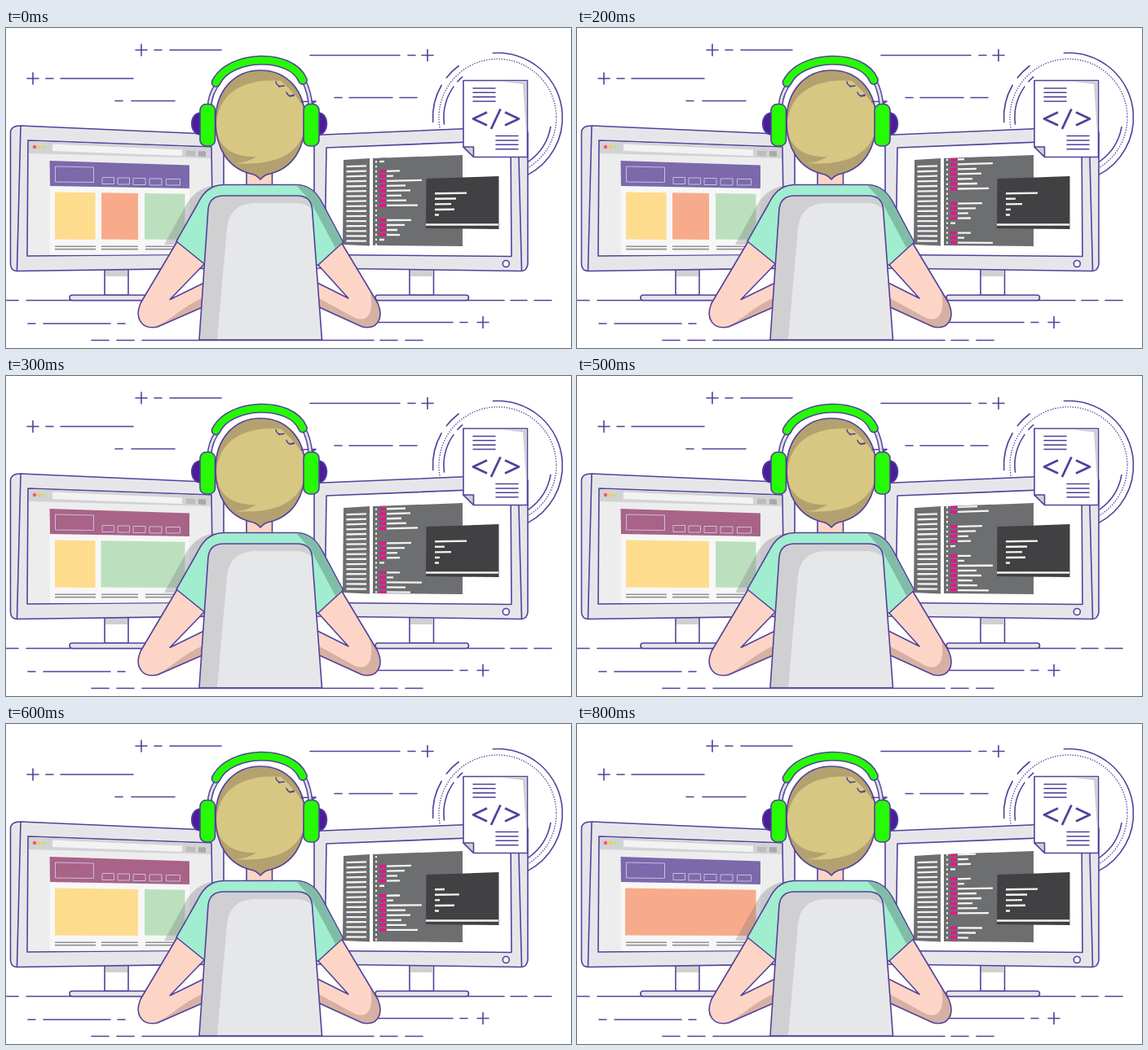
An HTML page for the animation above (0.9 s loop, 693 by 393 pixels).

```html
<!DOCTYPE html>
<html lang="en">
<head>
<meta charset="utf-8">
<title>Programmer at work</title>
<style>
  html, body { margin: 0; width: 100%; height: 100%; overflow: hidden; background: #fff; }
  svg { display: block; width: 693px; height: 393px; }
  .ink { stroke: #53419b; stroke-width: 1.6; stroke-linejoin: round; stroke-linecap: round; }
  .line { fill: none; }
  .case { fill: #e6e6ea; }
  .skin { fill: #fcd5c7; }
  .green { fill: #26fa05; }
</style>
</head>
<body>
<svg viewBox="0 0 693 393">
  <defs>
    <clipPath id="editor"><path d="M450 160L560 156V268L450 267Z"/></clipPath>
  </defs>

  <!-- Background dashes and ground -->
  <path class="ink line" d="M159 27h14M166 20v14M182 27h9M201 27h63
    M26 62h14M33 55v14M49 62h9M67 62h89M134 89.500h9M154 89.500h53
    M373 33.500h110M493 33.500h9M510 33.500h14M517 26.500v14
    M403 85.500h9M421 85.500h53M483 85.500h21
    M0 334.500h15M25 334.500h586M619 334.500h20M648 334.500h21
    M27 363h9M46 363h82M137 363h9M456 361.500h92M557 361.500h9M578 361.500h14M585 354.500v14
    M105 383.500h21M136 383.500h21M167 383.500h284M459 383.500h21M490 383.500h21"/>

  <!-- Badge rings: each dash is an arc in degrees -->
  <g class="ink line" transform="translate(603 110)">
    <circle r="79.500" pathLength="360" stroke-dasharray="157 203" transform="rotate(-94)"/>
    <circle r="79.500" pathLength="360" stroke-dasharray="34 8 15 303" transform="rotate(176)"/>
    <circle r="72" stroke-dasharray="0.100 3" style="stroke-width:1.500"/>
    <circle r="66" pathLength="360" stroke-dasharray="42 7 7 304" transform="rotate(173)"/>
    <circle r="66" pathLength="360" stroke-dasharray="45 315" transform="rotate(10)"/>
  </g>

  <!-- Left monitor -->
  <path class="ink" fill="#fff" d="M121 296H150V328H121Z"/>
  <path fill="#d0d0d2" d="M122 297H149V305H122Z"/>
  <rect class="ink case" x="78" y="328" width="122" height="6.500" rx="3.200"/>
  <path class="ink case" d="M18 120L267 131V295L13 298.500Q6 298 5.500 290V128Q6 120 18 120Z"/>
  <path class="ink line" d="M18 120.500L13.500 298"/>
  <path class="ink" fill="#ededed" d="M27 138L252 146L254 278L26 280Z"/>
  <path fill="#f7f7f7" d="M53.500 163L225 168.500V278L54 279Z"/>
  <path fill="#d2d3d5" d="M28 139L251 147V160L28 154Z"/>
  <path fill="#f3f3f4" d="M57 142.500L216 149.500V157L57 151Z"/>
  <path fill="#bcbcbe" d="M221 150.500l11 .500v6.500l-11-.500z"/>
  <path fill="#a9a9ab" d="M236 151l9 .500v6.500l-9-.500z"/>
  <circle cx="35" cy="146" r="2.200" fill="#f15a5a"/>
  <circle cx="40.700" cy="146.200" r="2.200" fill="#fbc75c"/>
  <circle cx="46.400" cy="146.400" r="2.200" fill="#c5dd85"/>
  <path id="banner" d="M53.500 163L225 168.500V197L54 194Z"/>
  <path fill="none" stroke="#c8bfdf" d="M60.500 170L107.500 171V189.500L60.500 189ZM118 183.500h14.500v8h-14.500zM137 184h14.500v8h-14.500zM156 184.500h15v8h-15zM176 185h15v8h-15zM196.500 185.500h17v7.500h-17z"/>
  <g id="cards"></g>
  <path stroke="#929295" stroke-width="1.600" d="M60 268.300h50M60 271.600h50M117 268.300h45M117 271.600h45M171 268.300h46M171 271.600h46"/>

  <!-- Right monitor -->
  <path class="ink" fill="#fff" d="M495 296H524.500V328H495Z"/>
  <path fill="#d0d0d2" d="M496 297H524V305H496Z"/>
  <rect class="ink case" x="453" y="328" width="114.500" height="6.500" rx="3.200"/>
  <path class="ink case" d="M378 131.500L628 121Q639 120 640 129V290Q639 298 632 298.500L378 295Z"/>
  <path class="ink line" d="M628 121L632.500 298"/>
  <path class="ink" fill="#fff" d="M393 147L619 138L620 280.500L391 278.500Z"/>
  <circle class="ink" fill="#fff" cx="613.300" cy="289.500" r="4"/>
  <path fill="#6d6e70" d="M414 162L446 160V267.500L413 266ZM450 160L560 156V268L450 267Z"/>
  <path id="sidebar" stroke="#f2f2f2" stroke-width="2.300"/>
  <g clip-path="url(#editor)">
    <path id="keywords" stroke="#e0188c" stroke-width="3.900"/>
    <path id="statements" stroke="#f4f4f4" stroke-width="2.300"/>
  </g>
  <path fill="#414042" d="M515.500 185L604.500 182V247L515 246Z"/>
  <path stroke="#f2f2f2" stroke-width="2.400" d="M515 241.500H604"/>
  <path id="terminal" stroke="#f2f2f2" stroke-width="2.400"/>

  <!-- Document badge -->
  <path class="ink" fill="#fff" d="M561 64.500H639.500V158.500H574L561 146Z"/>
  <path fill="#d0d0d2" d="M603 65.300L634 69L638.700 140V65.300Z"/>
  <path class="ink" fill="#d0d0d2" d="M561 146H573.500V158.500Z"/>
  <path class="ink line" d="M573 74h27M573 79.300h27M573 84.600h27M573 90h27M601 132.500h27M601 138h27M601 143.300h27M601 148.700h27"/>
  <path class="ink line" style="stroke-width:2.800;stroke-linecap:butt" d="M590 103.500L573 111.500L590 119.500M606.500 99.500L595 124M612 103.500L629 111.500L612 119.500"/>

  <!-- Person -->
  <path fill="#77777c" opacity=".32" d="M258 193C238 195 227 206 220 219L194 266L209 266L260 205Z"/>
  <path class="skin" d="M295 176H326.500V194H295Z"/>
  <path class="ink line" d="M295 176V193M326.500 176V193"/>
  <path class="skin" d="M210 262L165 338C157 357 167 371 186 367L243 342V313L201 333.500L243 290Z"/>
  <path fill="#d6b1a3" d="M178 368C200 363 209 346 242 331V342L189 366Z"/>
  <path class="ink line" d="M210 262L165 338C157 357 167 371 186 367L243 342M243 313L201 333.500L243 290"/>
  <path class="skin" d="M411 263L456 338C464 357 455 371 437 367L382 342V313L420 332L382 290Z"/>
  <path fill="#d6b1a3" d="M446 321L456 338C464 357 455 371 437 367L384 343V332L428 356C446 363 452 346 446 321Z"/>
  <path class="ink line" d="M411 263L456 338C464 357 455 371 437 367L382 342M382 313L420 332L382 290"/>
  <path class="ink" fill="#a1edcf" d="M267 192.500H356C374 193 382 204 388.500 216L413.500 263L383 291L243.500 290L209 262L235 216C241 204 249 193 267 192.500Z"/>
  <path fill="#80bda7" d="M356 193.300C374 194 382 204 388 217L412.500 262.500L404 270L373 212Z"/>
  <path fill="#e6e7e9" d="M237 383L248 222Q250 206 267 206H357Q374 206 375.500 222L387.500 383Z"/>
  <path fill="#d0d0d2" d="M237 383L248 222Q250 206 267 206H357Q373 206 375 223Q369 215 355 215H305Q274 216 271 246L259 383Z"/>
  <path class="ink line" d="M237 383L248 222Q250 206 267 206H357Q374 206 375.500 222L387.500 383Z"/>

  <!-- Head -->
  <path fill="#b3a26f" d="M312 52C345 52 367 77 367 114C367 147 352 172 324 179Q317 180 312 186Q307 180 300 179C272 172 257 147 257 114C257 77 280 52 312 52Z"/>
  <path fill="#d7c782" d="M258 125C257 85 285 61 337 65C345 72 358 84 367 100V115C366 151 336 170 281 166Q297 165 307 158C282 159 262 149 258 125Z"/>
  <path class="ink line" d="M312 52C345 52 367 77 367 114C367 147 352 172 324 179Q317 180 312 186Q307 180 300 179C272 172 257 147 257 114C257 77 280 52 312 52ZM331 66q1 7 10 5M335 72l5-1M344 79q2 6 9 4M348 84l5-2M362 90.500L380 90L367 98"/>

  <!-- Headphones -->
  <g fill="none" stroke-linecap="round">
    <path stroke="#53419b" stroke-width="6" d="M260 68C254 76 250 85 249.500 97M365 64C370 74 373 84 373.500 97"/>
    <path stroke="#dedee4" stroke-width="3" d="M260 68C254 76 250 85 249.500 97M365 64C370 74 373 84 373.500 97"/>
    <path stroke="#53419b" stroke-width="11.800" d="M257.500 67C274 32 350 30 364 64"/>
    <path stroke="#26fa05" stroke-width="8.600" d="M257.500 67C274 32 350 30 364 64"/>
  </g>
  <path class="ink" fill="#4b1d9b" d="M239 104C224 104 224 131 239 131ZM383 104C397 104 397 131 383 131Z"/>
  <rect class="ink green" x="238" y="93.500" width="18.500" height="51.500" rx="7.500"/>
  <rect class="ink green" x="365" y="93.500" width="19" height="51.500" rx="7.500"/>
</svg>

<script>
const STEP_MS = 100, STEPS = 9;
const ROW = 6, SCROLL = 10.2, FIRST_ROW = 236;
const $ = id => document.getElementById(id);

const YELLOW = '#fddc8d', ORANGE = '#f8ab8b', GREEN = '#bce0be';
const PURPLE = '#7b69ab', PLUM = '#a96387';
// Each card is [left, right, colour].
const layouts = [
  { until: 3, banner: PURPLE, cards: [[60, 109.5, YELLOW], [117, 162, ORANGE], [170, 219.5, GREEN]] },
  { until: 5, banner: PLUM, cards: [[60, 109.5, YELLOW], [116.5, 219.5, GREEN]] },
  { until: 7, banner: PLUM, cards: [[60, 162, YELLOW], [170, 219.5, GREEN]] },
  { until: 9, banner: PURPLE, cards: [[59, 219.5, ORANGE]] }
];

// Line lengths: 0 is an empty line, -1 a closing bracket.
const codeLines = [30, 22, 13, 16, -1, 0, 16, 8, 43, 23, 29, 18, 24, 38, 0, 0];
const outputs = { a: [39, 26, 20, 24, 5], b: [39, 12, 20, 6, 5], c: [12, 30, 6, 24, 5] };
const outputOrder = 'aabbaacca';

// A stroke on the tilted screen: rows fan out from the level row at y = 245.
function row(x, y, length) {
  const slope = (y - 245) * 0.0004;
  const at = px => `${px} ${y + (px - 462) * slope}`;
  return `M${at(x)}L${at(x + length)}`;
}

function drawCode(top) {
  let keywords = '', statements = '';
  const count = codeLines.length;
  for (let i = -count; i < 2 * count; i++) {
    const length = codeLines[(i + count) % count];
    const y = top + i * ROW;
    statements += row(453, y, 2);
    if (length < 0) statements += row(458, y, 6);
    if (length > 0) {
      keywords += row(458, y, 8);
      statements += row(467, y, length);
    }
  }
  $('keywords').setAttribute('d', keywords);
  $('statements').setAttribute('d', statements);
}

function drawSidebar() {
  let d = '';
  for (let y = 168.8; y < 264; y += 6.2) d += row(417.5, y, 24.5);
  $('sidebar').setAttribute('d', d);
}

function card([left, right, colour]) {
  const top = x => 201.5 + (x - 60) * 0.014;
  return `<path fill="${colour}" d="M${left} ${top(left)}L${right} ${top(right)}V260L${left} 259.5Z"/>`;
}

function draw(step) {
  const layout = layouts.find(l => step < l.until);
  $('banner').setAttribute('fill', layout.banner);
  $('cards').innerHTML = layout.cards.map(card).join('');
  drawCode(FIRST_ROW - SCROLL * step);
  $('terminal').setAttribute('d', outputs[outputOrder[step]]
    .map((length, i) => row(526, 204.3 + i * 6.4, length)).join(''));
}

let shown = -1;
const start = performance.now();
function tick() {
  const step = Math.floor((performance.now() - start) / STEP_MS) % STEPS;
  if (step !== shown) draw(shown = step);
  requestAnimationFrame(tick);
}

drawSidebar();
tick();
</script>
</body>
</html>
```
